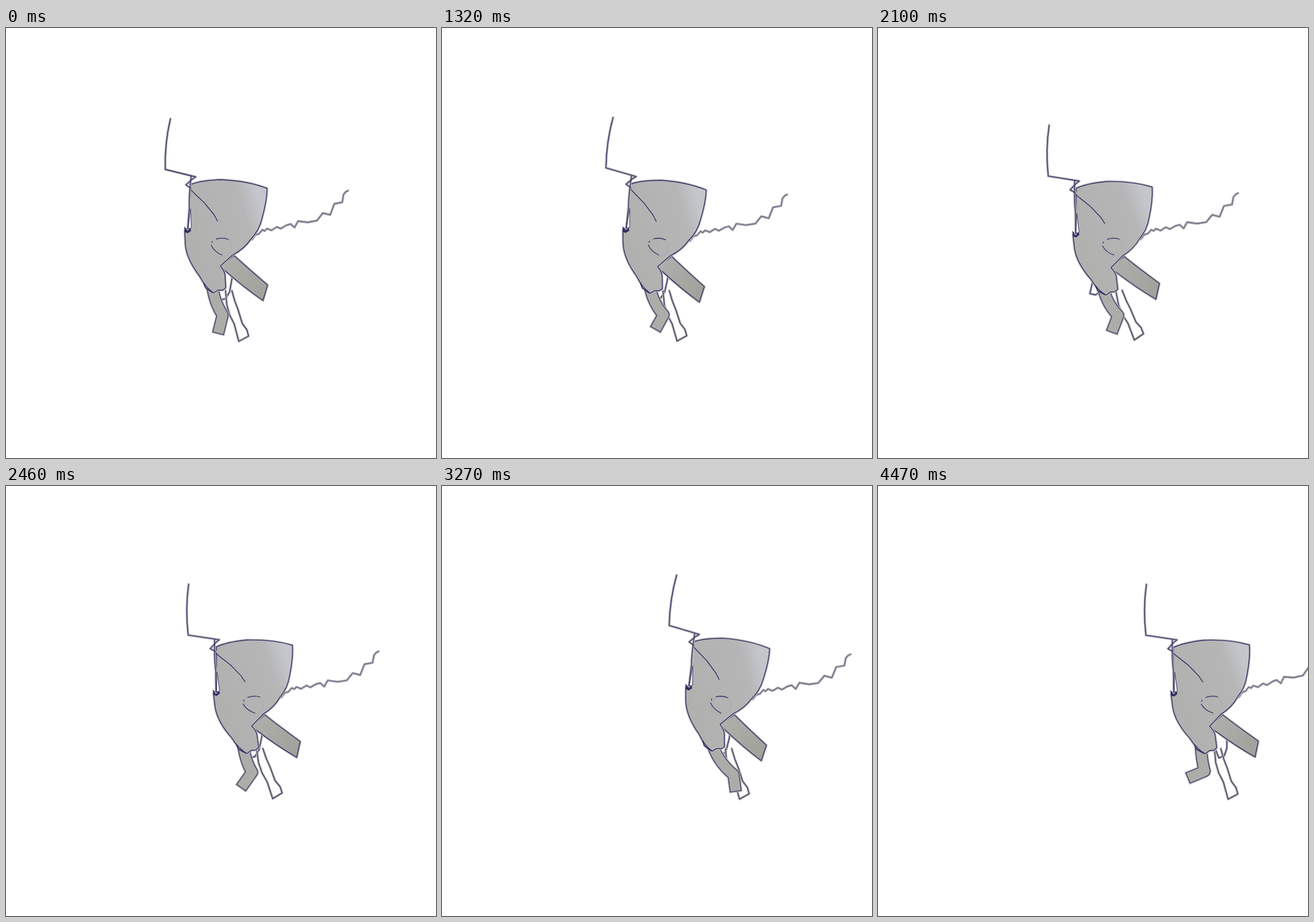
An HTML page with a canvas for the animation above (4500 ms loop, 748 by 748 pixels).

```html
<!DOCTYPE html>
<html lang="en">
<head>
<meta charset="utf-8">
<title>Walking sketch</title>
<style>
html, body { margin: 0; width: 100%; height: 100%; overflow: hidden; background: #fff; }
canvas { display: block; }
</style>
</head>
<body>
<canvas id="stage" width="748" height="748"></canvas>
<script>
const ctx = document.getElementById('stage').getContext('2d');
const LOOP = 4500, STEP = 30;
const INK = '#302e60', HALO = '#bababe';
const HIP_Y = 381;

// Pose values at the moments listed in TIMES; angles are in degrees.
const TIMES = [0, 1320, 2100, 2790, 3270, 3930, 4470];
const POSE = {
  x: [375, 378, 405, 451, 487, 533, 576],
  y: [380, 381, 383, 384, 381, 382, 384],
  body: [0, 1.4, -4, -4.4, 2.2, 1.9, -5],
  head: [0, 2.2, -4.8, -5.5, 2.6, 2.1, -5.3],
  tail: [0, 1.5, 1.7, 1.7, 2.3, 2, -2.5],
  farLimb: [0, 3, 23, -16.5, 4, 0, -11],
  whiteLeg: [0, -1, -6, -1, -1, 2.7, -0.5],
  kneeX: [2, 8, 11, -11, 21, 1, -10],
  kneeY: [118, 118, 119, 115, 121, 119, 115],
  footX: [-6, -6, 0, -37, 25, -19, -39],
  footY: [150, 143, 148, 140, 150, 144, 127]
};

// Line art, drawn around the eye at (0, 0).
const ART = {
  body: new Path2D('M-53-108 Q-35-115 0-116 Q45-114 79-101 Q79-80 70-48 Q65-27 51-13 Q40 4 19 15 L-2 34 Q5 42 6 50 L7 72 L2 76 L-6 76 L-14 81 Q-29 70 -38 52 Q-61 22 -63-4 L-64-28 L-57-33 Q-56-70 -53-108Z'),
  antenna: new Path2D('M-89-222 Q-99-180 -98-134 L-45-121 L-51-117 L-62-107 L-53-101 M-53-122 Q-57-85 -56-68 L-59-30'),
  sliver: new Path2D('M-54-65 L-58-31 L-53-32Z'),
  mouth: new Path2D('M-53-98 L-46-91 L-30-76 L-13-55 L-7-44'),
  chin: new Path2D('M-65-35 L-60-29 L-54-32 L-53-27 L-59-23 L-64-25Z'),
  eye: new Path2D('M-9-14 Q3-17 12-13 M-18-3 Q-12 9 1 14 M-17-8 L-16-10'),
  arm: new Path2D('M22 16 Q48 40 80 67 L72 94 Q40 72 6 42 L-2 34Z'),
  tail: new Path2D('M0 0 L6-8 L12-10 L18-17 L22-15 L26-19 L34-16 L43-22 L50-19 L60-25 L67-27 L74-21 L80-32 L97-30 L113-33 L123-46 L136-43 L143-62 L157-65 L159-78 L163-83 L167-85'),
  farLimb: new Path2D('M-10 20 L-13 70 L-9 92 L1 90 L8 78 L12 55 L12 20'),
  whiteLeg: new Path2D('M-5 0 L-3 24 L2 42 L10 58 L18 88 L35 79 L32 68 L24 57 L17 34 L11 18 L6 0'),
  heel: new Path2D('M-31 64 L-28 72 L-16 80')
};

function sample(values, t) {
  let i = 0;
  while (i < TIMES.length - 2 && t >= TIMES[i + 1]) i++;
  const slope = k => (values[k + 1] - values[k]) / (TIMES[k + 1] - TIMES[k]);
  const tangent = k => {
    if (k === 0) return 0;
    if (k === TIMES.length - 1) return slope(k - 1);
    const a = slope(k - 1), b = slope(k);
    return a * b > 0 ? 2 * a * b / (a + b) : 0;
  };
  const span = TIMES[i + 1] - TIMES[i], u = (t - TIMES[i]) / span, v = 1 - u;
  return values[i] * (1 + 2 * u) * v * v + values[i + 1] * u * u * (3 - 2 * u)
    + span * u * v * (tangent(i) * v - tangent(i + 1) * u);
}

function placed(x, y, degrees, draw) {
  ctx.save();
  ctx.translate(x, y);
  ctx.rotate(degrees * Math.PI / 180);
  draw();
  ctx.restore();
}

function line(path, width, color) {
  ctx.lineWidth = width;
  ctx.strokeStyle = color;
  ctx.stroke(path);
}

function sketch(path, fill, ink = INK, weight = 1.4) {
  line(path, weight + 3, HALO);
  if (fill) {
    ctx.fillStyle = fill;
    ctx.fill(path);
  }
  line(path, weight, ink);
}

function shade(x0, y0, x1, y1, ...stops) {
  const g = ctx.createLinearGradient(x0, y0, x1, y1);
  stops.forEach((color, i) => g.addColorStop(i / (stops.length - 1), color));
  return g;
}

const bodyFill = shade(-60, 20, 82, -20, '#b0b0af', '#b1b1b0', '#b3b3b3', '#b4b4b4', '#b6b6b7', '#c4c6cc');
const armFill = shade(10, 30, 78, 82, '#adaeaa', '#a0a19a');

function greyLeg(p) {
  const dx = p.footX - p.kneeX, dy = p.footY - p.kneeY, length = Math.hypot(dx, dy);
  const stroke = (extra, width, color) => {
    const path = new Path2D();
    path.moveTo(-17, 62);
    path.quadraticCurveTo(-17 + (p.kneeX + 17) * 0.2, 96, p.kneeX, p.kneeY);
    path.lineTo(p.footX + dx / length * extra, p.footY + dy / length * extra);
    line(path, width, color);
  };
  ctx.lineCap = 'butt';
  stroke(2.2, 23.4, HALO);
  stroke(0.7, 20.6, '#403e68');
  stroke(-0.7, 17.8, '#acada9');
  ctx.lineCap = 'round';
}

function drawEye() {
  ctx.beginPath();
  ctx.arc(0, 0, 17, 0, Math.PI * 2);
  ctx.lineWidth = 0.6;
  ctx.strokeStyle = '#a3a3a5';
  ctx.stroke();
  line(ART.eye, 1.3, INK);
}

function drawBody() {
  sketch(ART.arm, armFill);
  sketch(ART.body, bodyFill);
  line(ART.heel, 2, INK);
  ctx.fillStyle = INK;
  ctx.fill(ART.chin);
}

function drawHead() {
  sketch(ART.antenna);
  line(ART.mouth, 1.4, INK);
  ctx.fillStyle = '#fff';
  ctx.fill(ART.sliver);
  line(ART.sliver, 0.9, INK);
}

function draw(t) {
  const p = {};
  for (const key in POSE) p[key] = sample(POSE[key], t);
  ctx.fillStyle = '#fff';
  ctx.fillRect(0, 0, 748, 748);
  ctx.lineJoin = ctx.lineCap = 'round';
  // Hips and eye swing against the lean of the body.
  const sway = -0.45 * p.body;
  const a = p.body * Math.PI / 180, c = Math.cos(a), s = Math.sin(a);
  placed(p.x + 53 * c + 12 * s, p.y + 53 * s - 12 * c, p.tail,
    () => sketch(ART.tail, null, '#64617f'));
  placed(p.x + sway, HIP_Y, 0, () => {
    placed(6, 0, p.farLimb, () => sketch(ART.farLimb));
    placed(12, 76, p.whiteLeg, () => sketch(ART.whiteLeg, null, '#393653'));
    greyLeg(p);
  });
  placed(p.x, p.y, p.body, drawBody);
  placed(p.x, p.y, p.head, drawHead);
  placed(p.x + 2 * sway, HIP_Y, p.body, drawEye);
}

const start = performance.now();
function tick() {
  const t = (performance.now() - start) % LOOP;
  draw(Math.floor(t / STEP) * STEP);
  requestAnimationFrame(tick);
}
tick();
</script>
</body>
</html>
```
